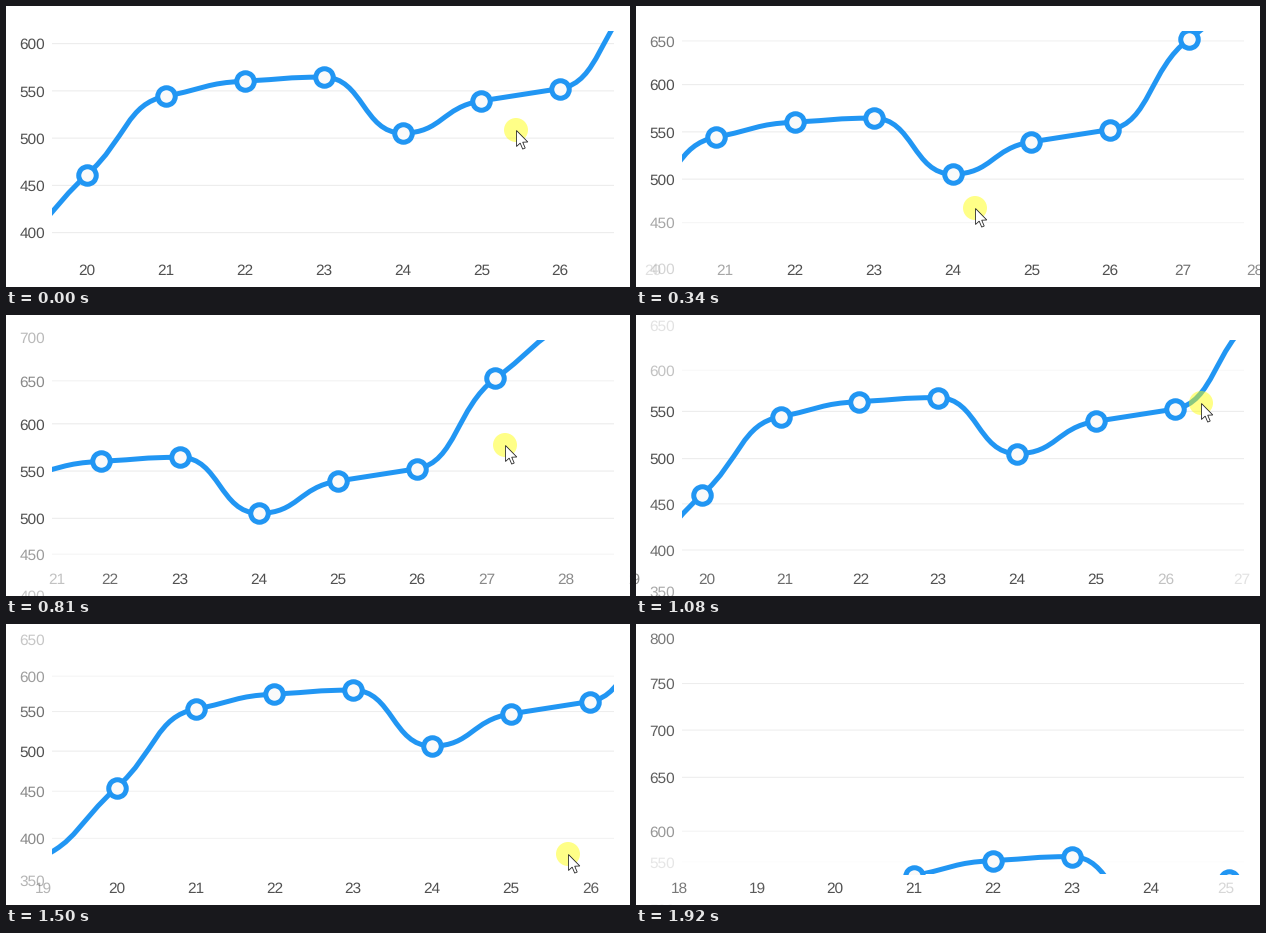
These frames come from a looping animation (624x281 px, 1990 ms). A matplotlib script:

```python
import numpy as np
import matplotlib.pyplot as plt
from matplotlib.animation import FuncAnimation
from matplotlib.patches import Circle, PathPatch, Polygon, Rectangle
from matplotlib.path import Path

W, H, DPI = 624, 281, 64
PT = 72 / DPI
LOOP, TICK = 1990, 10
BLUE = "#2196f3"
LEFT, RIGHT, TOP, BOTTOM = 46, 608, 25, 250
STEP = np.array([78.83, -0.945])     # pixels per unit
BASE = np.array([24, 500])           # data point that sits at the pan position
FOLLOW = 250                         # ms the chart trails behind the mouse
FADE = 190                           # ms time constant of label fades

# The picture refreshes every 70 ms, now and then after 60 ms
STEPS = np.cumsum([0] + [60 if k in (3, 7, 8, 14) else 70 for k in range(28)])

# Drag path: time, chart pan, mouse tip
DRAG = np.array([
    (0, 396.5, 132.1, 510, 124),
    (340, 316.5, 173.1, 339, 202),
    (600, 235.5, 209.6, 326, 206),
    (810, 253, 203.3, 499, 130),
    (1080, 381, 143.6, 565, 88),
    (1500, 426, 127.1, 562, 230),
    (1920, 514.5, 293.6, 653, 335),
])
TIMES, PAN, MOUSE = DRAG[:, 0], DRAG[:, 1:3], DRAG[:, 3:]
GRIP = MOUSE[0] - PAN[0]
SPEED = (MOUSE - GRIP - PAN) / FOLLOW

X_TICKS = np.arange(18, 30)
Y_TICKS = np.arange(350, 801, 50)
VALUES = [350, 386, 461.4, 544.4, 560.3, 564.5, 505.3, 539.4, 552.4, 648, 709, 745]

plt.rcParams["text.hinting"] = "none"


def drag(t):
    """Pan of the chart at time t and how far the mouse leads it."""
    i = min(np.searchsorted(TIMES, t, side="right") - 1, len(TIMES) - 2)
    d = TIMES[i + 1] - TIMES[i]
    u = (t - TIMES[i]) / d
    p, q, v, w = PAN[i], PAN[i + 1], SPEED[i], SPEED[i + 1]
    pan = ((1 + 2 * u) * (1 - u) ** 2 * p + u * u * (3 - 2 * u) * q
           + d * u * (1 - u) * ((1 - u) * v - u * w))
    vel = (6 * u * (1 - u) * (q - p) / d
           + (1 - u) * (1 - 3 * u) * v + u * (3 * u - 2) * w)
    return pan, vel * FOLLOW


def tick_states(ticks, axis, lo, hi):
    """Position and opacity of every tick at each refresh.

    Ticks fade towards whether the mouse wants them in view; new ones
    run ahead of the chart, leaving ones stay behind.
    """
    states, alpha = [], None
    for dt, t in zip(np.diff(STEPS, prepend=0), STEPS):
        pan, lead = (part[axis] for part in drag(t))
        pos = pan + STEP[axis] * (ticks - BASE[axis])
        wanted = (lo < pos + lead) & (pos + lead < hi)
        if alpha is None:
            alpha = wanted.astype(float)
        alpha = wanted + (alpha - wanted) * np.exp(-dt / FADE)
        shift = (1 - alpha) * lead * np.where(wanted, 0.4, -0.2)
        states.append(list(zip(pos + shift, alpha)))
    return states


def curve_verts(pts):
    """Bezier points with the flatter neighbour slope as tangent, level at peaks."""
    s = np.diff(pts[:, 1]) / np.diff(pts[:, 0])
    a, b = s[:-1], s[1:]
    inner = np.where(a * b > 0, np.sign(a) * np.minimum(abs(a), abs(b)), 0)
    slope = np.concatenate([s[:1], inner, s[-1:]])
    handle = np.column_stack([np.ones_like(slope), slope]) * STEP[0] / 2
    verts = [pts[0]]
    for i in range(len(pts) - 1):
        verts += [pts[i] + handle[i], pts[i + 1] - handle[i + 1], pts[i + 1]]
    return np.array(verts)


fig = plt.figure(figsize=(W / DPI, H / DPI), dpi=DPI, facecolor="white")
ax = fig.add_axes([0, 0, 1, 1])
ax.set(xlim=(0, W), ylim=(H, 0))
ax.axis("off")


def clip_to(artist, x0, y0, x1, y1):
    artist.set_clip_path(Rectangle((x0, y0), x1 - x0, y1 - y0, transform=ax.transData))
    return artist


def in_plot(artist):
    return clip_to(artist, LEFT, TOP, RIGHT, BOTTOM)


def label(value, x, y, ha):
    text = ax.text(x, y, str(value), ha=ha, va="baseline", color="#505050",
                   family="Liberation Sans", size=15.4 * PT, zorder=1)
    return clip_to(text, 0, 11, W, 274)


def grid_line():
    line, = ax.plot([LEFT, RIGHT], [0, 0], color="#ebebeb", lw=PT, snap=False, zorder=0)
    return in_plot(line)


def fade(artist, alpha):
    artist.set_visible(alpha > 0.02)
    artist.set_alpha(alpha)


x_labels = [label(n, 0, 269, "center") for n in X_TICKS]
y_labels = [label(v, 39, 0, "right") for v in Y_TICKS]
grid = [grid_line() for v in Y_TICKS]
x_states = tick_states(X_TICKS, 0, LEFT, RIGHT)
y_states = tick_states(Y_TICKS, 1, TOP, BOTTOM)

POINTS = STEP * (np.column_stack([X_TICKS, VALUES]) - BASE)
VERTS = curve_verts(POINTS)
CODES = [Path.MOVETO] + [Path.CURVE4] * (len(VERTS) - 1)
curve = in_plot(ax.add_patch(PathPatch(Path(VERTS, CODES), fc="none", ec=BLUE,
                                       lw=5 * PT, zorder=2)))
dots, = ax.plot([], [], "o", ms=17.5 * PT, mfc="#fafafa", mec=BLUE, mew=5 * PT,
                snap=False, zorder=3)
in_plot(dots)

ARROW = np.array([(0, 0), (0, 16), (3.7, 12.6), (6.2, 18.6), (8.7, 17.5), (6.2, 11.7), (11.3, 11.5)])
glow = ax.add_patch(Circle((0, 0), 12, fc="#ffff00", ec="none", alpha=0.47, zorder=4))
arrow = ax.add_patch(Polygon(ARROW, fc="white", ec="#202020", lw=0.8 * PT,
                             joinstyle="miter", zorder=5))


def draw(i):
    k = np.searchsorted(STEPS, i * TICK, side="right") - 1
    for text, (x, alpha) in zip(x_labels, x_states[k]):
        text.set_x(x)
        fade(text, alpha)
    for text, line, (y, alpha) in zip(y_labels, grid, y_states[k]):
        text.set_y(y + 5.6)
        line.set_ydata([y, y])
        fade(text, alpha)
        fade(line, alpha)

    pan, lead = drag(STEPS[k])
    curve.set_path(Path(VERTS + pan, CODES))
    dots.set_data(*(POINTS + pan).T)
    tip = pan + lead + GRIP
    glow.center = tip
    arrow.set_xy(ARROW + tip + 0.5)
    return []


anim = FuncAnimation(fig, draw, frames=LOOP // TICK, interval=TICK,
                     repeat=True, repeat_delay=0, blit=False)
plt.show()
```
